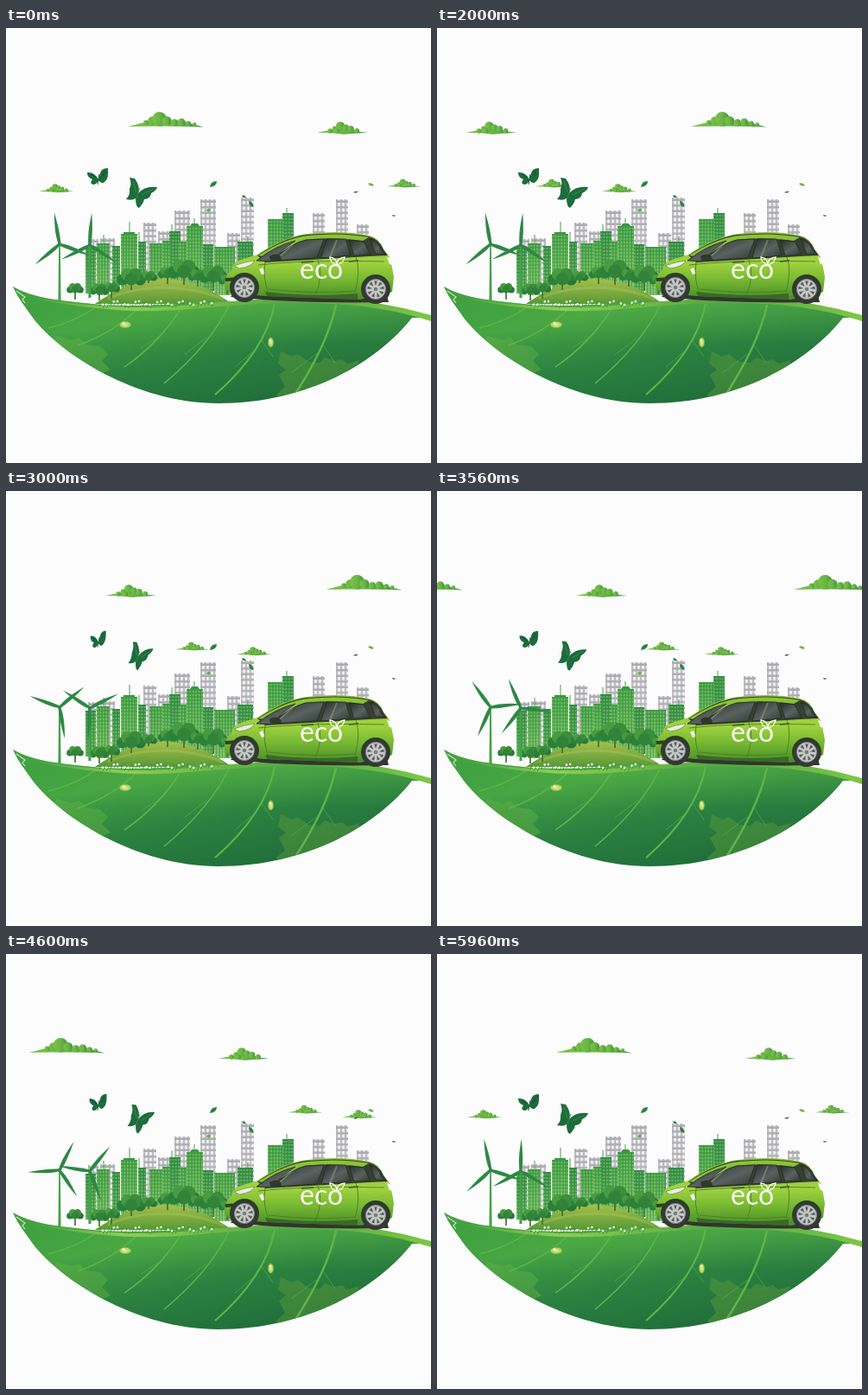
An HTML page that plays this animation: 492 px wide and 503 px high, repeating every 6000 ms.

```html
<!DOCTYPE html>
<html lang="en">
<head>
<meta charset="utf-8">
<title>Eco city on a leaf</title>
<style>
  html, body { margin: 0; width: 100%; height: 100%; overflow: hidden; background: #fcfcfc; }
  svg { display: block; width: 100%; height: 100%; }
</style>
</head>
<body>
<svg viewBox="0 0 492 503">
  <defs>
    <linearGradient id="cloudFill"><stop stop-color="#7cc247"/><stop offset=".5" stop-color="#6cb545"/><stop offset="1" stop-color="#3d9741"/></linearGradient>
    <linearGradient id="leafFill" x1=".1" y1="0" x2=".75" y2="1"><stop stop-color="#258b3a"/><stop offset=".28" stop-color="#43a343"/><stop offset=".6" stop-color="#2b8140"/><stop offset="1" stop-color="#1f6939"/></linearGradient>
    <linearGradient id="glow" x1="0" y1="0" x2="0" y2="1"><stop stop-color="#61b947" stop-opacity=".55"/><stop offset=".5" stop-color="#61b947" stop-opacity="0"/></linearGradient>
    <linearGradient id="rib"><stop stop-color="#3d9d40"/><stop offset=".25" stop-color="#8fce50"/><stop offset=".65" stop-color="#55a940"/><stop offset="1" stop-color="#7cc744"/></linearGradient>
    <linearGradient id="hillFill" x1="0" y1="0" x2="0" y2="1"><stop stop-color="#a5bf4c"/><stop offset="1" stop-color="#579936"/></linearGradient>
    <linearGradient id="green" x1="0" y1="0" x2="0" y2="1"><stop stop-color="#46a445"/><stop offset="1" stop-color="#85c66a"/></linearGradient>
    <linearGradient id="deep" x1="0" y1="0" x2="0" y2="1"><stop stop-color="#368f46"/><stop offset="1" stop-color="#5fb056"/></linearGradient>
    <linearGradient id="gray" x1="0" y1="0" x2="0" y2="1"><stop stop-color="#aaa9ae"/><stop offset="1" stop-color="#c2c2c4"/></linearGradient>
    <linearGradient id="paint" x1="0" y1="0" x2="0" y2="1"><stop stop-color="#8fc83d"/><stop offset=".45" stop-color="#a1d23f"/><stop offset=".7" stop-color="#78b932"/><stop offset="1" stop-color="#478b28"/></linearGradient>
    <linearGradient id="glass" x1="0" y1="0" x2="1" y2="1"><stop stop-color="#262d2b"/><stop offset=".55" stop-color="#59625f"/><stop offset="1" stop-color="#303735"/></linearGradient>
    <radialGradient id="drop"><stop stop-color="#e5efa2"/><stop offset="1" stop-color="#9cc94c"/></radialGradient>
    <pattern id="panes" x="1.5" y="4" width="5" height="6.5" patternUnits="userSpaceOnUse"><path d="M.5 0h3v4h-3z" fill="#f7f7f8"/></pattern>
    <pattern id="bars" width="3.4" height="4" patternUnits="userSpaceOnUse"><path d="M2.6 0v4" stroke="#26833f" stroke-width=".8"/><path d="M0 3h2" stroke="#a2d67e" stroke-width=".8"/></pattern>
    <path id="leaf" d="M8 299C30 312 60 315 100 319C160 325 220 315 280 316C360 312 440 322 484 335L470 335C430 386 350 434 246 434C150 434 62 376 31 335C22 322 15 314 8 299Z"/>
    <clipPath id="leafClip"><use href="#leaf"/></clipPath>
  </defs>

  <g id="clouds" fill="url(#cloudFill)"></g>
  <g id="city"></g>
  <path d="M103 319C128 302 152 290 183 290C216 290 240 304 262 319Z" fill="url(#hillFill)"/>
  <path d="M118 313C154 297 207 295 252 314" fill="none" stroke="#b9ce62" stroke-width="3" opacity=".3"/>
  <g id="trees"></g>
  <g id="turbines"></g>

  <use href="#leaf" fill="url(#leafFill)"/>
  <use href="#leaf" fill="url(#glow)"/>
  <g clip-path="url(#leafClip)">
    <path d="M318 374q8 3 12 6l8-3 12 9 13 1 6-6 12 4 8-2 6 5 14-4-8 40-80 20-8-20 10-9-7-14 8-6-9-7z" fill="#5c9b3b" opacity=".45"/>
    <path d="M58 356l18 5 9-3 7 8 17 2 9 9-7 8 10 10-18 8-50-35z" fill="#69b444" opacity=".4"/>
    <g fill="none" stroke="#5eb648" stroke-width="1.5">
      <path d="M382 320Q372 368 329 432" stroke-width="2.4"/>
      <path d="M311 319Q300 374 242 424" stroke-width="2"/>
      <path d="M259 319Q237 366 183 411"/>
      <path d="M204 322Q178 364 137 392"/>
      <path d="M153 324Q125 352 83 367"/>
      <path d="M105 322Q82 339 49 347"/>
      <path d="M290 371l-25 21M359 377l-29 22M232 358l-26 20M177 357l-21 13M366 365l15 22M295 360l14 20" stroke-width=".8" opacity=".7"/>
    </g>
  </g>
  <path d="M18 308C56 317 99 321 145 323C207 324 258 313 330 313C398 311 446 319 492 332V339C446 324 396 317 330 318C260 318 207 329 145 327C99 325 50 318 18 308Z" fill="url(#rib)"/>
  <path d="M12 304l10 7-3 3 3 4" fill="none" stroke="#bfe5b9" stroke-width="1.2"/>
  <g id="flowers"></g>
  <g fill="url(#drop)" stroke="#5b9f35" stroke-width=".6">
    <ellipse cx="138" cy="343" rx="7" ry="4"/><ellipse cx="306.5" cy="363.5" rx="3.3" ry="5.8"/>
  </g>
  <g fill="#fff"><circle cx="136" cy="341.5" r="1.3"/><circle cx="306" cy="361" r="1.1"/></g>

  <g id="car">
    <path d="M260 311Q340 319 443 317L440 306 270 299Z" fill="#30362e"/>
    <path d="M253 299Q252 287 261 280Q262 270 275 267L291 262Q322 241 348 238Q390 233 420 240Q432 242 437 256L445 266 449 288 447 305 440 308 410 314 300 310 258 306Z" fill="url(#paint)"/>
    <path d="M291 263Q322 242 348 239Q390 235 420 241Q432 244 437 256L442 263 421 264 370 267 300 271Z" fill="#354031"/>
    <path d="M292 263Q323 243 350 240Q388 236 420 242L413 246Q374 241 346 245Q326 252 309 266Z" fill="#8ac338"/>
    <g fill="url(#glass)" stroke="#242b25" stroke-width=".8">
      <path d="M290 269Q311 252 335 246Q319 256 306 270Z"/>
      <path d="M309 269Q329 249 347 245L368 244 360 266Z"/>
      <path d="M371 244L393 244 399 263 365 266Z"/>
      <path d="M397 245L414 247 422 262 403 263Z"/>
      <path d="M421 244Q430 245 435 258L440 262 428 261Z"/>
    </g>
    <path d="M333 249L314 267M383 245l-8 20" stroke="#a3aaa4" stroke-width="2" opacity=".45"/>
    <path d="M264 275Q277 270 288 269Q285 276 270 278Z" fill="#e9efe3" stroke="#638c32" stroke-width=".7"/>
    <path d="M254 289l16-1 2 4-18 1z" fill="#314026"/>
    <path d="M293 279l4-2 3 7-4 1z" fill="#f1f6e9"/>
    <path d="M305 264q7-5 13 0l1 4q-7 4-13 0z" fill="#30382d"/>
    <path d="M441 265l4 1 3 8-4-1z" fill="#fff"/>
    <g fill="none" stroke="#497f25" stroke-width=".9">
      <path d="M300 271Q297 290 304 307M361 268Q368 286 358 309M405 265Q411 280 404 306"/>
      <path d="M304 302Q357 308 405 304M292 274Q345 268 438 270"/>
    </g>
    <path d="M342 270l14-1v2l-14 1zM397 269l11-1v2l-11 1z" fill="#446d26"/>
    <path d="M300 305Q357 312 407 307L407 314 302 310Z" fill="#3a6926"/>
    <g id="wheels"></g>
    <text x="340" y="290" font-family="Lato, 'Open Sans', sans-serif" font-size="32" fill="#f4faec">eco</text>
    <path d="M383 274Q374 270 375 265Q383 266 383 274Q383 266 392 265Q391 272 383 274Z" fill="none" stroke="#f4faec" stroke-width="1.4"/>
  </g>

  <g fill="#24843d">
    <path d="M236 184q1-7 8-7q0 6-8 7zM273 194q3-2 5 2q-4 1-5-2zM281 200q6 1 5 7q-5-1-5-7zM402 190q3-2 6-1q-3 3-6 1z"/>
    <path d="M419 180q4-2 7 2q-4 2-7-2z" fill="#68b344"/>
    <path d="M447 216l5 1-4 1z" fill="#455d49"/>
    <path d="M232 211q2-4 5-1q-2 5-5 1z" fill="#64b34a"/>
  </g>
  <g id="butterflies" fill="#1d6c3c">
    <g><path d="M107 175Q102 166 94 167Q94 173 100 175Q96 180 101 181Q105 181 107 176Q111 182 115 177Q119 174 118 162Q110 162 109 168Z"/><path d="M106 181l2-12M98 169l6 4M115 165l-4 7" stroke="#155033"/></g>
    <g><path d="M153 191Q156 184 149 174L143 173Q146 180 143 186Q144 193 139 198Q146 200 150 197Q150 207 154 208Q159 203 160 198Q167 198 168 191Q174 188 175 184Q161 182 153 191Z"/><path d="M150 199l5-14M147 177l4 13M171 186l-14 7" stroke="#3b9148" stroke-width=".8"/></g>
  </g>
</svg>
<script>
const byId = id => document.getElementById(id);
const fill = (id, items, draw) => { byId(id).innerHTML = items.map(draw).join(''); };
const circle = (x, y, r, attrs = '') => `<circle cx="${x}" cy="${y}" r="${r}" ${attrs}/>`;
const LOOP = 6000;

// City: x, top, width
const building = (color, pattern, foot) => ([x, y, w]) => {
  const box = f => `<rect width="${w}" height="${foot - y}" fill="url(#${f})"/>`;
  return `<g transform="translate(${x} ${y})">${box(color)}${box(pattern)}</g>`;
};
const grays = [[95, 244, 12], [109, 243, 17], [159, 225, 15], [176, 235, 15], [195, 211, 18], [225, 198, 18],
  [256, 237, 15], [272, 196, 15], [355, 214, 14], [382, 198, 14], [406, 227, 14]];
const deeps = [[92, 254, 12], [123, 252, 9], [153, 247, 9], [189, 235, 13], [228, 250, 12], [268, 247, 18], [320, 214, 13]];
const greens = [[105, 249, 15], [133, 238, 19], [166, 249, 15], [181, 246, 10], [201, 247, 10],
  [209, 229, 19], [241, 253, 24], [303, 221, 18]];
byId('city').innerHTML = grays.map(building('gray', 'panes', 301)).join('') +
  deeps.map(building('deep', 'bars', 307)).join('') +
  greens.map(building('green', 'bars', 309)).join('') +
  '<path d="M113 249v-10M143 238v-14M154 247v-11M192 235v-8M218 229v-9M325 214v-6M280 247v-6" stroke="#4a9f4b"/>' +
  '<path d="M213 229h11l-2-3h-7zM136 238h13v-2h-13z" fill="#3c9745"/>';

// Trees: x, crown centre, radius, trunk foot
const tree = ([x, y, r, foot]) =>
  `<path d="M${x} ${foot}V${y}m0 ${r * .7}l${r * .6}-${r * .5}" stroke="#4b6d31" stroke-width="1.7" fill="none"/>` +
  [[-.85, .25, .55], [.85, .25, .55], [-.4, -.25, .6], [.4, -.2, .65], [0, .2, .6]]
    .map(([a, b, c], i) => circle(x + a * r, y + b * r, c * r, `fill="${['#2b803a', '#287638', '#499b40', '#3b8d3b', '#32833a'][i]}"`)).join('');
fill('trees', [[108, 302, 8, 315], [80, 301, 7, 314], [122, 300, 7, 313], [145, 288, 12, 303],
  [165, 287, 7, 295], [187, 283, 8, 296], [206, 279, 13, 297], [222, 286, 8, 299], [240, 285, 12, 304], [256, 291, 7, 308]], tree);

fill('flowers', [...Array(32).keys()], i => {
  const x = 108 + i * 4.2, y = 318 + Math.sin(i * 7.3) * 2;
  return `<path d="M${x} ${y + 4}l2-5" stroke="#3f983b"/>` + (i % 3 ? circle(x, y, 1.3, 'fill="#f5faed"') : '');
});

fill('wheels', [[276, 300, 16], [428, 302, 16]], ([x, y, r]) =>
  circle(x, y, r + 1, 'fill="#294022"') + circle(x, y + 1, r - .5, 'fill="#353837"') +
  circle(x, y, 11.5, 'fill="#c4c8c6" stroke="#818884"') +
  [...Array(9).keys()].map(i => `<path d="M${x} ${y - 4}l-1.8-5.5h3.6z" fill="#555b58" transform="rotate(${i * 40} ${x} ${y})"/>`).join('') +
  circle(x, y, 2.3, 'fill="#777e78"'));

// Each cloud leaves to the right while its next copy arrives from the left.
const puffs = (base, bumps) => `<path d="${base}"/>` + bumps.map(b => circle(...b)).join('');
const bigCloud = puffs('M0 17Q15 13 24 11H65Q77 15 88 17.5Q44 16 0 17Z',
  [[21, 12.5, 3], [28, 10.5, 5], [36.5, 8.5, 8.5], [45, 10.5, 5.5], [54, 12.5, 4.2], [62, 12, 4.5], [70, 13.5, 3], [77, 14.5, 2.3]]);
const smallCloud = puffs('M0 13Q9 11 17 10H43Q51 13 59 13Q39 14 31 15Q19 13 0 13Z',
  [[15, 11, 2.8], [20.5, 8.5, 3], [27, 5.5, 5.2], [33, 7, 3.6], [39, 8.5, 3.6], [46, 11, 3], [23, 11, 3]]);
const clouds = [[141, 97, 1, bigCloud], [360, 108, 1, smallCloud], [38, 180, .69, smallCloud], [441, 174.5, .67, smallCloud]];
fill('clouds', clouds, ([, , , shape]) => `<g>${shape}</g>`.repeat(2));
const cloudNodes = byId('clouds').children;

// Turbines: hub x, hub y, starting angle, foot
const turbines = [[62, 250, -8, 315], [97, 251, 5, 312]];
const blade = a => `<path d="M-1 0Q-4.5-11-1-37Q2.5-16 1.5 0Z" transform="rotate(${a})"/>`;
fill('turbines', turbines, ([x, y, , foot]) =>
  `<path d="M${x - .8} ${y}h1.6L${x + 1.6} ${foot}h-3.2z" fill="#45a14c"/>` +
  `<g class="rotor" fill="#2e8845">${[0, 120, 240].map(blade).join('')}${circle(0, 0, 2.2)}</g>`);
const rotors = document.querySelectorAll('.rotor');

const insects = [[107, 175, 10], [153, 191, 20]];
const insectNodes = byId('butterflies').children;

function frame() {
  const p = performance.now() % LOOP / LOOP;
  clouds.forEach(([x, y, s], i) => [x + 458 * p, x - 490 * (1 - p)].forEach((cx, j) =>
    cloudNodes[i * 2 + j].setAttribute('transform', `translate(${cx} ${y}) scale(${s})`)));
  turbines.forEach(([x, y, a], i) =>
    rotors[i].setAttribute('transform', `translate(${x} ${y}) rotate(${a + 360 * p})`));
  const spread = .87 + .13 * Math.cos(p * 6 * Math.PI);
  insects.forEach(([x, y, a], i) => insectNodes[i].setAttribute('transform',
    `translate(${x} ${y}) rotate(${a}) scale(${spread} 1) rotate(${-a}) translate(${-x} ${-y})`));
  requestAnimationFrame(frame);
}
frame();
</script>
</body>
</html>
```
